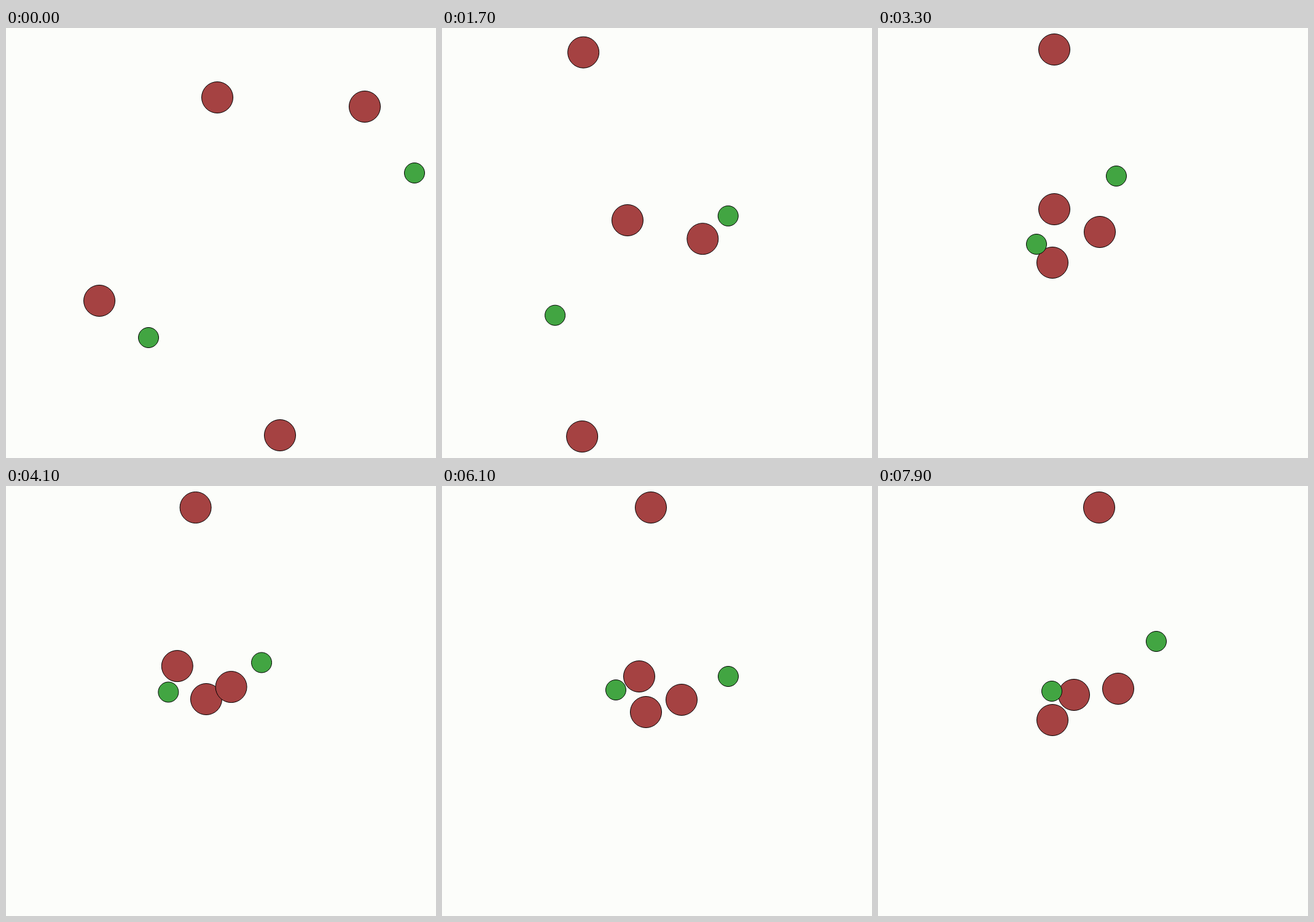
These frames come from a looping animation (700x700 px, 8000 ms). An HTML page:

```html
<!DOCTYPE html>
<html lang="en">
<head>
<meta charset="utf-8">
<title>Swarm</title>
<style>
  html, body { margin: 0; width: 100%; height: 100%; overflow: hidden; background: #fcfdfa; }
  svg { display: block; width: 100%; height: 100%; }
  circle { stroke: #000; stroke-width: 1; }
  .big { fill: #a54242; r: 25.5px; }
  .small { fill: #42a542; r: 16.5px; }
</style>
</head>
<body>
<svg viewBox="0 0 700 700"></svg>
<script>
const LOOP = 8, STEP = 0.1, WALL = 35, SIZE = 700;

// Key points [x, y] at shared times in seconds.
// A point beyond a wall makes the ball slide along that wall.
const times = [0, 0.9, 2.5, 3.3, 5, 6.1, 7.9];
const last = times.length - 1;
const swarm = {
  big: [
    [[344, 113], [238, 103], [261, -20], [287, -20], [327, -20], [340, -20], [360, -20]],
    [[584, 128], [386, 266], [278, 314], [287, 295], [276, 301], [321, 310], [319, 340]],
    [[152, 444], [293, 386], [476, 321], [361, 332], [332, 362], [332, 368], [284, 381]],
    [[446, 663], [349, 760], [173, 507], [284, 382], [414, 320], [390, 348], [391, 330]]
  ],
  small: [
    [[665, 236], [606, 373], [355, 211], [388, 241], [442, 327], [466, 310], [453, 253]],
    [[232, 504], [168, 526], [228, 391], [258, 352], [264, 332], [283, 332], [283, 334]]
  ]
};

const gap = i => times[i + 1] - times[i];
const clamp = p => Math.min(SIZE - WALL, Math.max(WALL, p));

// Velocity at a key point, from the parabola through it and its neighbours.
function velocity(p, i) {
  const mean = k => (p[k + 1] - p[k]) / gap(k);
  if (i === 0) return 2 * mean(0) - velocity(p, 1);
  if (i === last) return 2 * mean(last - 1) - velocity(p, last - 1);
  return (mean(i - 1) * gap(i) + mean(i) * gap(i - 1)) / (gap(i - 1) + gap(i));
}

// Position along one axis: smooth cubic between key points, kept inside the walls.
function positionAt(p, t) {
  let i = 0;
  while (i < last - 1 && t >= times[i + 1]) i++;
  const u = (t - times[i]) / gap(i), v = 1 - u;
  return clamp(
    v * v * (1 + 2 * u) * p[i] + u * u * (3 - 2 * u) * p[i + 1] +
    u * v * gap(i) * (v * velocity(p, i) - u * velocity(p, i + 1))
  );
}

const svg = document.querySelector('svg');
const balls = Object.entries(swarm).flatMap(([kind, paths]) => paths.map(path => {
  const node = document.createElementNS(svg.namespaceURI, 'circle');
  node.setAttribute('class', kind);
  svg.append(node);
  return { node, cx: path.map(q => q[0]), cy: path.map(q => q[1]) };
}));

function draw(t) {
  for (const ball of balls)
    for (const axis of ['cx', 'cy'])
      ball.node.setAttribute(axis, positionAt(ball[axis], t));
}

const start = performance.now();
function tick() {
  const ms = (performance.now() - start) % (LOOP * 1000);
  draw(Math.floor(ms / (STEP * 1000)) * STEP);
  requestAnimationFrame(tick);
}
draw(0);
requestAnimationFrame(tick);
</script>
</body>
</html>
```
